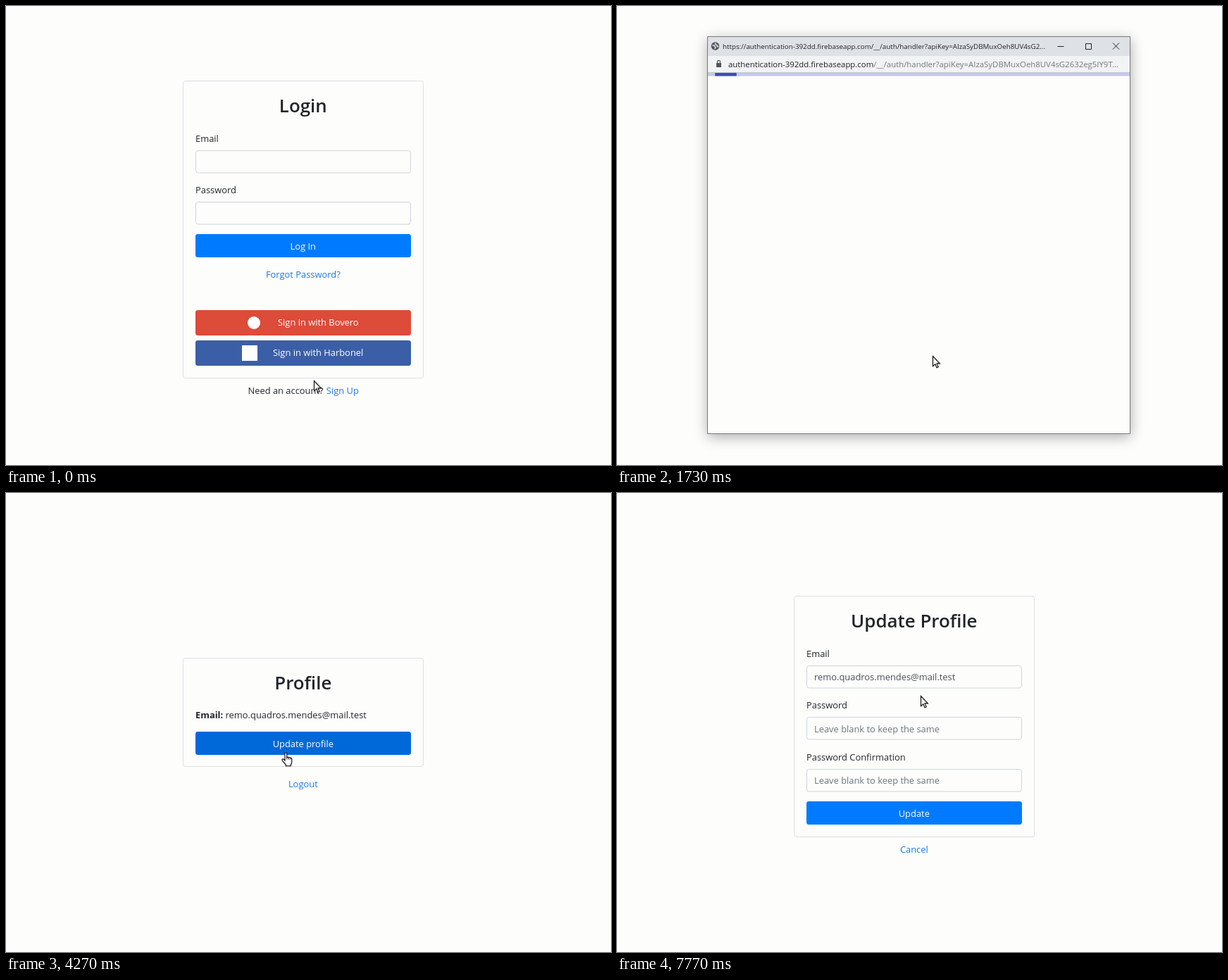
These frames come from a looping animation (859 by 652 pixels, 8000 ms). An HTML page with a canvas:

```html
<!DOCTYPE html>
<html lang="en">
<head>
<meta charset="utf-8">
<title>Login flow</title>
<style>
  html, body { margin: 0; width: 100%; height: 100%; overflow: hidden; background: #fdfdfc; }
  canvas { display: block; }
</style>
</head>
<body>
<canvas id="stage" width="859" height="652"></canvas>
<script>
const ctx = document.getElementById('stage').getContext('2d');
const LOOP = 8000, MID = 421.8, LEFT = 269, WIDTH = 306;
const PAPER = '#fdfdfc', INK = '#212529', LINK = '#1a78e6', BLUE = '#007bff', MUTED = '#6c757d';
const BODY = 12.9, SMALL = 9.8;
const EMAIL = 'remo.quadros.mendes@mail.test';
const HOST = 'authentication-392dd.firebaseapp.com';
const FIRST = { title: '/__/auth/handler?apiKey=AIzaSyDBMuxOeh8UV4sG2...',
                url: '/__/auth/handler?apiKey=AIzaSyDBMuxOeh8UV4sG2632eg5IY9T...' };
const SECOND = { title: '/__/auth/handler?code=AQDIH0i0gdhnuGRPBmU7me...',
                 url: '/__/auth/handler?code=AQDIH0i0gdhnuGRPBmU7mePgK8SIkUs...' };

// Pointer glides; bow bends a glide up or down.
const START = { x: 437, y: 532 };
const GLIDES = [
  { from: 30, to: 830, x: 448, y: 497, bow: -50 },
  { from: 1950, to: 2450, x: 391, y: 368, bow: 0 },
  { from: 5000, to: 5500, x: 459, y: 388, bow: -20 },
  { from: 5500, to: 6500, x: 420, y: 352, bow: 38 },
  { from: 6830, to: 7600, x: 431, y: 288, bow: 0 }
];

const clamp = v => Math.max(0, Math.min(1, v));
const ramp = (t, start, length) => clamp((t - start) / length);
const smooth = v => v * v * (3 - 2 * v);

function heldTime(t) {
  if (t < 1570 || t >= 6730) return t;
  const step = 250, burst = 70, since = (t + 20) % step;
  return Math.max(1570, t - since + Math.min(since, burst));
}

function pointerAt(t) {
  let { x, y } = START;
  for (const g of GLIDES) {
    const k = smooth(ramp(t, g.from, g.to - g.from));
    x += (g.x - x) * k;
    y += (g.y - y) * k + g.bow * Math.sin(Math.PI * k);
  }
  return { x, y };
}

// Clickable areas of the page being drawn
let hot = [];
const addHot = (x, y, w, h) => hot.push({ x, y, w, h });

function text(str, x, y, color = INK, size = BODY, weight = 400, align = 'left') {
  ctx.font = `${weight} ${size}px "Open Sans", "Noto Sans", sans-serif`;
  ctx.textAlign = align;
  ctx.fillStyle = color;
  ctx.fillText(str, x, y);
  return ctx.measureText(str).width;
}
const centered = (str, y, color, size, weight) => text(str, MID, y, color, size, weight, 'center');

function link(str, y) {
  const w = centered(str, y, LINK);
  addHot(MID - w / 2, y - 12, w, 16);
}

function rect(x, y, w, h, color) {
  ctx.fillStyle = color;
  ctx.fillRect(x, y, w, h);
}

function box(x, y, w, h, fill, stroke) {
  ctx.beginPath();
  ctx.roundRect(x, y, w, h, 3.4);
  if (fill) { ctx.fillStyle = fill; ctx.fill(); }
  if (stroke) { ctx.strokeStyle = stroke; ctx.lineWidth = 1; ctx.stroke(); }
}

function card(title, top, height) {
  box(251.5, top, 341, height, null, '#dedfe0');
  centered(title, top + 44.5, INK, 25.9, 600);
}

function field(label, y, value = '', color = MUTED) {
  text(label, LEFT, y - 12);
  box(LEFT + .5, Math.round(y) + .5, WIDTH - 1, 31.5, PAPER, '#ced4da');
  text(value, 280, y + 21.5, color);
}

function button(label, y, color = BLUE) {
  const top = Math.round(y);
  box(LEFT, top, WIDTH, 33, color);
  centered(label, top + 21.5, '#fff');
  addHot(LEFT, top, WIDTH, 33);
}

function socialButton(label, x, y, color) {
  box(LEFT, y, WIDTH, 36, color);
  text(label, x, y + 22, '#fff');
  addHot(LEFT, y, WIDTH, 36);
}

function form(title, top, height, fields, action) {
  const pitch = 73.6, first = top + 98;
  card(title, top, height);
  fields.forEach(([label, value, color], i) => field(label, first + pitch * i, value, color));
  button(action, first + pitch * fields.length - 27.4);
}

function drawLogin() {
  form('Login', 106.5, 422, [['Email'], ['Password']], 'Log In');
  link('Forgot Password?', 386);
  socialButton('Sign in with Bovero', 386, 432, '#dd4b39');
  ctx.beginPath();
  ctx.arc(352, 450, 9, 0, 7);
  ctx.fill();
  socialButton('Sign in with Harbonel', 379, 475, '#3b5fa6');
  rect(335, 482, 22, 22, '#fff');
  const w = text('Need an account? ', 343.5, 551);
  text('Sign Up', 344.5 + w, 551, LINK);
}

function drawProfile(t) {
  const hover = t < 6000 ? 1 - ramp(t, 5480, 150) : ramp(t, 6400, 130);
  card('Profile', 234.5, 154);
  const w = text('Email: ', LEFT, 320, INK, BODY, 700);
  text(EMAIL, LEFT + w, 320);
  button('Update profile', 339, `rgb(0,${123 - 18 * hover},${255 - 38 * hover})`);
  link('Logout', 418);
}

function drawUpdate() {
  const hint = 'Leave blank to keep the same';
  const fields = [['Email', EMAIL, '#495057'], ['Password', hint], ['Password Confirmation', hint]];
  form('Update Profile', 146.5, 342, fields, 'Update');
  link('Cancel', 511);
}

function stroke(color, width, path) {
  ctx.strokeStyle = color;
  ctx.lineWidth = width;
  ctx.stroke(new Path2D(path));
}

function drawWindow(address) {
  ctx.shadowColor = 'rgba(0,0,0,.33)';
  ctx.shadowBlur = 18;
  ctx.shadowOffsetY = 4;
  rect(128.5, 43.5, 600, 564, PAPER);
  ctx.shadowColor = 'transparent';
  rect(129, 44, 599, 27, '#dee1e6');
  rect(129, 71, 599, 23, '#f1f3f4');
  rect(129, 94, 599, 1, '#c6c9d2');

  // Globe
  ctx.beginPath();
  ctx.arc(139.5, 57, 5.8, 0, 7);
  ctx.fillStyle = '#50545a';
  ctx.fill();
  stroke('#dee1e6', 1.6, 'M135.5 55.5l3 1.2 1.5 2.3-1.2 2.2M140 52.5l-.6 2 2.6 1 .6 2.2 2-.5');
  text('https://' + HOST + address.title, 150, 60.5, '#202124', SMALL);

  // Window controls
  stroke('#222', 1, 'M625.5 57.5h9M665.5 53.5h8v8h-8zM704 52.5l9 9M713 52.5l-9 9');

  // Padlock
  rect(141, 81, 7, 6, '#50545a');
  stroke('#50545a', 1.2, 'M142.5 81v-1.6a2 2 0 0 1 4 0V81');
  const w = text(HOST, 158, 86.5, '#202124', 11.4);
  text(address.url, 158 + w, 86.5, '#74787d', 11.4);
}

function drawBar(age) {
  const p = clamp(age / 1000), span = 599;
  rect(129, 95, span, 4.5, '#c5c8e9');
  rect(129 + span * .25 * p, 95, span * .75 * p, 4.5, '#3f4db8');
}

function drawStatus(alpha) {
  ctx.globalAlpha = alpha;
  rect(129, 588, 198, 19, '#dee1e6');
  text('Aguardando authentication-392dd.fireb...', 134, 602, '#5f6368', SMALL);
  ctx.globalAlpha = 1;
}

function drawPopup(t) {
  const shown = smooth(ramp(t, 1130, 220)) * (1 - smooth(ramp(t, 4000, 150)));
  if (!shown) return;
  const scale = .9 + .1 * shown;
  ctx.save();
  ctx.globalAlpha = shown;
  ctx.translate(428.5, 326);
  ctx.scale(scale, scale);
  ctx.translate(-428.5, -326);
  drawWindow(t < 2980 ? FIRST : SECOND);
  if (t >= 1730 && t < 2130) drawBar(t - 1663);
  if (t >= 2980) drawBar(t - 2873);
  const status = ramp(t, 2710, 90) * (1 - ramp(t, 3150, 200));
  if (status) drawStatus(status);
  ctx.strokeStyle = '#77797c';
  ctx.lineWidth = 1;
  ctx.strokeRect(128.5, 43.5, 600, 564);
  ctx.restore();
}

const ARROW = new Path2D('M.5 .5V14.8L3.8 11.7 6 16.7 8.2 15.8 6 10.9H10.4Z');
const HAND = new Path2D('M5 12V2.2a1.4 1.4 0 0 1 2.8 0V7.5q1.5-1 2.5 .4q1.5-.9 2.5 .5q1.8-.6 2 1.2' +
  'v4.2q0 2-1.3 3.8v2.2H6.3v-2L1.4 12.3q-1-1.6 .3-2.3q1.2-.4 2.2 1z');

function drawPointer({ x, y }, hand) {
  const shape = hand ? HAND : ARROW;
  ctx.save();
  ctx.translate(x, y);
  ctx.fillStyle = '#fff';
  ctx.fill(shape);
  ctx.strokeStyle = '#000';
  ctx.lineWidth = 1.1;
  ctx.stroke(shape);
  if (hand) stroke('#000', .9, 'M7.8 7.5v3M10.3 8v2.6M12.8 8.5v2.3');
  ctx.restore();
}

function draw(now) {
  const t = heldTime(now % LOOP);
  hot = [];
  rect(0, 0, 859, 652, PAPER);
  if (t < 4180) drawLogin();
  else if (t < 6830) drawProfile(t);
  else drawUpdate();
  drawPopup(t);

  const tip = pointerAt(t);
  const covered = t > 1200 && t < 4100;
  const hand = !covered && hot.some(a =>
    tip.x >= a.x && tip.x <= a.x + a.w && tip.y >= a.y && tip.y <= a.y + a.h);
  drawPointer(tip, hand);
}

const begin = performance.now();
function tick() {
  draw(performance.now() - begin);
  requestAnimationFrame(tick);
}
tick();
</script>
</body>
</html>
```
